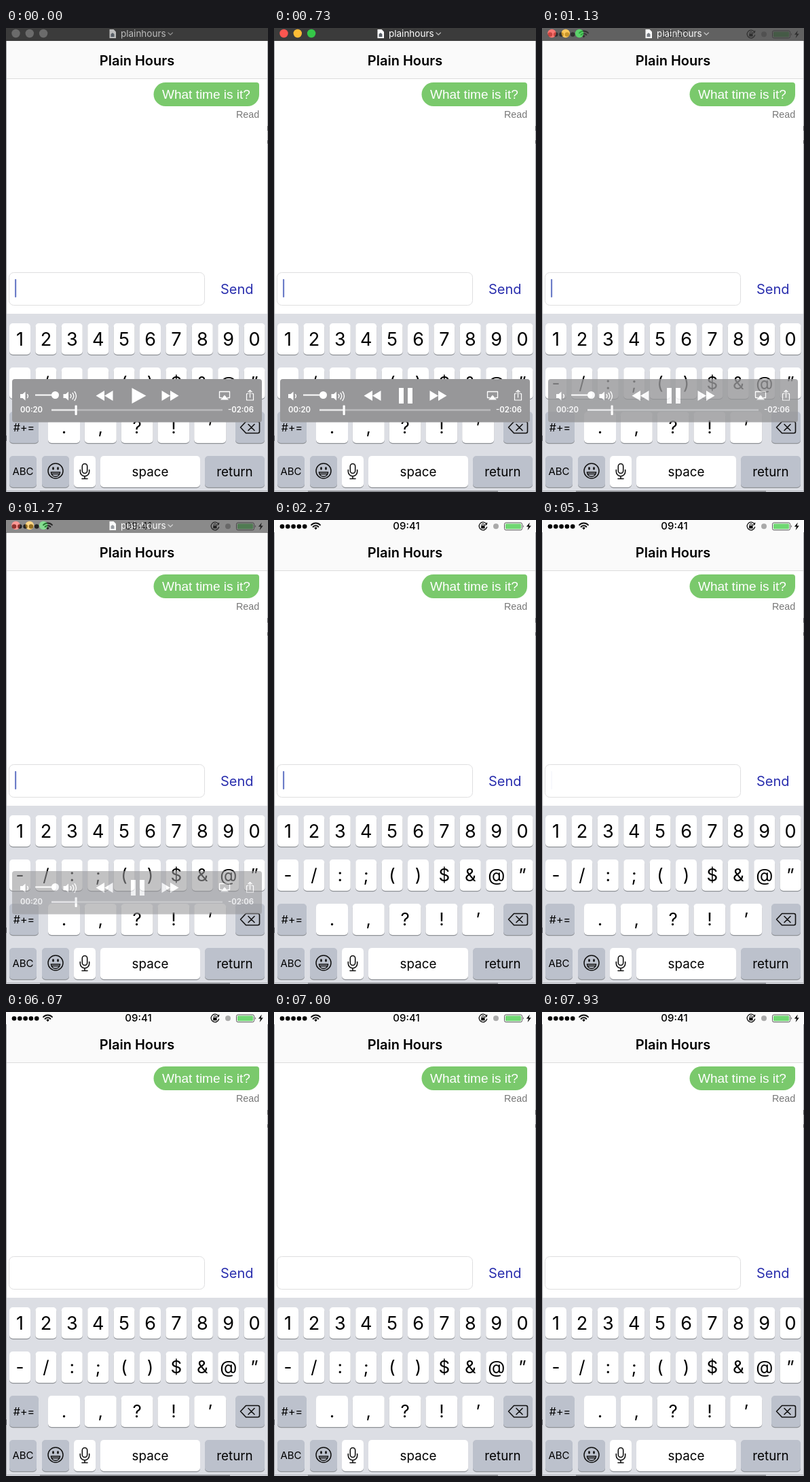
Write an HTML page that moves like this. It is 386 px wide and 682 px high and loops after 8000 ms.

```html
<!DOCTYPE html>
<html lang="en">
<head>
<meta charset="utf-8">
<title>Plain Hours</title>
<style>
  html, body { margin: 0; width: 100%; height: 100%; overflow: hidden; background: #fff; }
  svg { display: block; width: 100%; height: 100%; font-family: Inter, Roboto, sans-serif; }
  .arial { font-family: "Liberation Sans", Arial, sans-serif; }
  .mid { text-anchor: middle; }
  .line { fill: none; stroke: currentColor; stroke-linecap: round; stroke-linejoin: round; }
</style>
</head>
<body>
<svg viewBox="0 0 386 682">
  <rect width="386" height="682" fill="#fff"/>
  <rect width="386" height="74" fill="#fafafa"/>
  <path d="M0 74.5H386" stroke="#dcdcdc"/>

  <g id="status" color="#111">
    <g id="signal"></g>
    <g class="line" stroke-width="2" stroke-linecap="butt">
      <path d="M55 7.3a8.8 8.8 0 0 1 13 0M57.6 10a5.3 5.3 0 0 1 7.8 0"/>
    </g>
    <path d="M61.5 14.3l-2.2-2.6a3.1 3.1 0 0 1 4.4 0z"/>
    <text class="mid" x="195" y="14.3" font-size="15" font-weight="500">09:41</text>
    <path class="line" stroke-width="1.3" d="M312.6 5.5a5.8 5.8 0 1 0 1 5M311 7.3l2.2-.6.5-2.3"/>
    <rect x="305.2" y="8.3" width="5.4" height="4.3" rx=".6"/>
    <path class="line" d="M306.3 8.2V7a1.6 1.6 0 0 1 3.2 0v1.2"/>
    <circle cx="327" cy="9.3" r="4" fill="#aaa"/>
    <rect x="339.5" y="4" width="26" height="10.8" rx="2.2" fill="none" stroke="#555"/>
    <rect x="341" y="5.5" width="23" height="7.8" rx="1" fill="#70d873"/>
    <path d="M367 7.3q2 2 0 4z" fill="#555"/>
    <path d="M376.8 3.8l-5 6h3.2l-1.4 5.2 5.2-6.6h-3.2z"/>
  </g>

  <text class="mid" x="193" y="55" font-size="20" font-weight="600">Plain Hours</text>
  <path d="M235 80H369a4 4 0 0 1 4 4V98a17 17 0 0 1-17 17H235a17.3 17.3 0 0 1 0-35z" fill="#7ac96c"/>
  <g class="arial">
    <text x="230" y="104" font-size="19" fill="#fff">What time is it?</text>
    <text x="339" y="132" font-size="14.3" fill="#777">Read</text>
  </g>
  <rect x="4.5" y="359.5" width="288" height="48" rx="7" fill="#fff" stroke="#dfdfe0"/>
  <rect id="caret" x="13" y="369" width="2.2" height="27" rx="1" fill="#6c7dc8"/>
  <text class="mid" x="340.3" y="391" font-size="20" fill="#2a2fae">Send</text>

  <rect y="420" width="386" height="262" fill="#dcdee4"/>
  <g id="keys"></g>
  <g class="line" color="#111" stroke-width="1.6">
    <path d="M353.5 578.5H371q2.5 0 2.5 2.5v12q0 2.5-2.5 2.5H353.5L345.5 587zM357 582.5l9 9m0-9l-9 9"/>
    <circle cx="73" cy="651" r="11" stroke-width="1.5"/>
    <path d="M66.3 653h13.4q-1 6.3-6.7 6.3t-6.7-6.3zM67 655.5h12" stroke-width="1.4"/>
    <path d="M69.5 646.5v1.8M76.5 646.5v1.8" stroke-width="2.6"/>
    <rect x="112.3" y="640.5" width="7.4" height="14" rx="3.7"/>
    <path d="M109.3 649.5v2.5a6.7 6.7 0 0 0 13.4 0v-2.5M116 659v3.5M112 662.5h8"/>
  </g>

  <g fill="none">
    <path d="M.5 18V682M385.5 18V682" stroke="#a4a5a8"/>
    <path d="M0 680.5H386" stroke="#aeb0b5"/>
    <path d="M50 681H330M385.5 144v7M385.5 165v5M.5 599v8" stroke="#55565a"/>
  </g>

  <g id="titlebar">
    <rect width="386" height="19" fill="#3b3b3b"/>
    <g id="lights"></g>
    <g id="caption" color="#bcbcbc" fill="currentColor">
      <path d="M152.5 2h6l3.500 3.500v9.500h-9.500z"/>
      <path d="M154.500 13v-4l2.500-2 2.500 2v4z" fill="#596068"/>
      <text x="169" y="13" font-size="13.5">plainhours</text>
      <path class="line" stroke-width="1.2" d="M239 7l3.200 3 3.200-3" opacity=".65"/>
    </g>
  </g>

  <g id="player" fill="#fff" color="#fff">
    <rect x="9" y="516" width="368" height="63.500" rx="4" fill="#979799"/>
    <path id="speaker" d="M21 538h3.500l4-3.500v13l-4-3.500H21z"/>
    <path class="line" stroke-width="1.3" d="M31.500 538.500q2 2.500 0 5"/>
    <path d="M43 539.500H72" stroke="#fff" stroke-width="2"/>
    <circle cx="72.500" cy="539.500" r="5.500"/>
    <use href="#speaker" x="63.500"/>
    <path class="line" stroke-width="1.3" d="M95 538.500q2 2.500 0 5M98 536.500q3.500 4.500 0 9M101 534.500q5 6.500 0 13"/>
    <path d="M145 533v15l-12.500-7.500zM157.500 533v15l-12.500-7.500z"/>
    <path d="M229.500 533v15l12.500-7.500zM242 533v15l12.500-7.500z"/>
    <path id="play" d="M185.500 529l21 11.500-21 11.500z"/>
    <path id="pause" d="M184 529h7v23h-7zM197 529h7v23h-7z"/>
    <path class="line" stroke-width="1.300" d="M317.500 543.500H314.500V534.500H329.500V543.500H326.500"/>
    <path d="M322 539.500l6 7H316z"/>
    <path class="line" stroke-width="1.200" d="M357 537.500H354.500V547H364.500V537.500H362M359.500 543V532.500M356.800 535l2.700-2.700 2.700 2.700"/>
    <g font-size="11.300" font-weight="600">
      <text x="21" y="565">00:20</text>
      <text x="365" y="565" text-anchor="end">-02:06</text>
    </g>
    <path d="M67 561.500H319" stroke="#b9b9bb" stroke-width="2.500"/>
    <path d="M67 561.500H103" stroke="#e4e4e5" stroke-width="2.500"/>
    <rect x="101.500" y="554.500" width="3.200" height="14.500" rx="1"/>
  </g>
</svg>
<script>
const byId = id => document.getElementById(id);
const keys = byId('keys');

function add(parent, tag, attrs, text = '') {
  const node = document.createElementNS('http://www.w3.org/2000/svg', tag);
  for (const name in attrs) node.setAttribute(name, attrs[name]);
  node.textContent = text;
  parent.append(node);
  return node;
}

function key(label, x, y, width, size = 27, dark = false) {
  const box = { x, width, height: 46, rx: 5 };
  add(keys, 'rect', { ...box, y: y + 1.2, fill: '#8f9297' });
  add(keys, 'rect', { ...box, y, fill: dark ? '#bcc1cc' : '#fff' });
  add(keys, 'text', {
    class: 'mid', x: x + width / 2, y: y + 23 + size * 0.36, 'font-size': size
  }, label);
}

[...'1234567890'].forEach((c, i) => key(c, 5 + i * 38.4, 434, 31));
[...'-/:;()$&@”'].forEach((c, i) => key(c, 5 + i * 38.4, 499, 31, 26));
[...'.,?!’'].forEach((c, i) => key(c, 62 + i * 53.8, 564, 47, 26));
key('#+=', 5, 564, 43, 16, true);
key('', 338, 564, 43, 16, true);
key('ABC', 5, 629, 40, 15, true);
key('', 53, 629, 40, 16, true);
key('', 100, 629, 32);
key('space', 139, 629, 147, 18.8);
key('return', 293, 629, 88, 18.8, true);

for (let i = 0; i < 5; i++) add(byId('signal'), 'circle', { cx: 12 + i * 8.3, cy: 9.5, r: 3.3 });
const lightColors = ['#fc5650', '#fdbc35', '#35c748'];
const lights = lightColors.map((_, i) => add(byId('lights'), 'circle', { cx: 14.5 + i * 20.3, cy: 8, r: 6.2 }));

const ramp = (t, from, to) => Math.min(1, Math.max(0, (t - from) / (to - from)));

// The caret blinks once a second after playback resumes.
function caretOpacity(t) {
  if (t < 1300) return 1;
  const phase = t % 1000;
  return phase < 500 ? ramp(phase, 124, 270) : 1 - ramp(phase, 650, 820);
}

function draw(t) {
  const playing = t >= 500;
  const overlay = 1 - ramp(t, 1000, 1650);
  byId('caret').setAttribute('opacity', caretOpacity(t));
  byId('titlebar').setAttribute('opacity', overlay);
  byId('player').setAttribute('opacity', overlay);
  byId('play').setAttribute('opacity', playing ? 0 : 1);
  byId('pause').setAttribute('opacity', playing ? 1 : 0);
  byId('caption').setAttribute('color', playing ? '#fff' : '#bcbcbc');
  lights.forEach((light, i) => light.setAttribute('fill', playing ? lightColors[i] : '#6b6b6b'));
}

const start = performance.now();
function tick() {
  draw((performance.now() - start) % 8000);
  requestAnimationFrame(tick);
}
tick();
</script>
</body>
</html>
```
